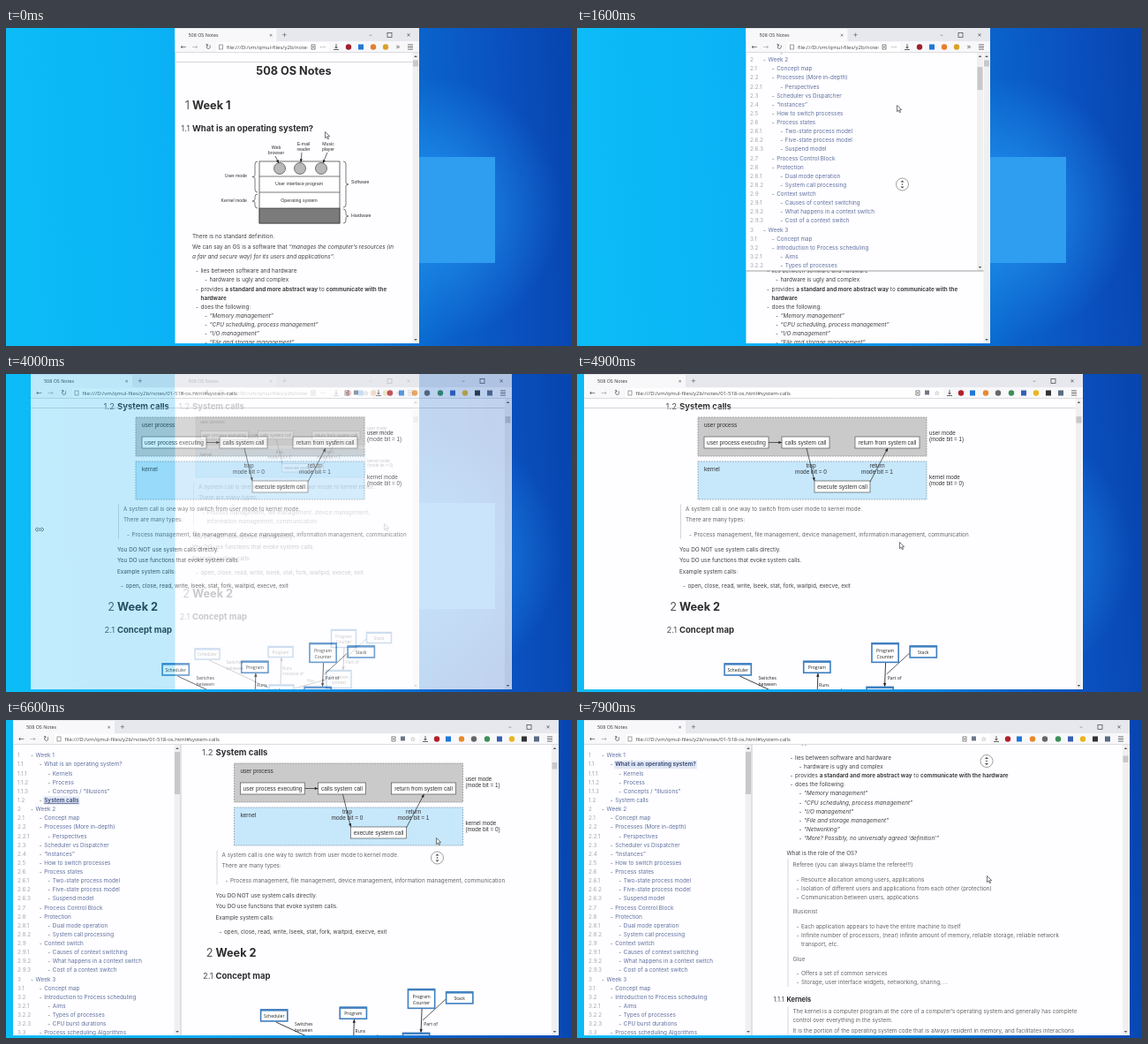
Recreate the animation shown at these times as an HTML page with a canvas. Size 640 px wide and 360 px high, loop 8000 ms.

```html
<!DOCTYPE html>
<html lang="en">
<head>
<meta charset="utf-8">
<title>OS Notes</title>
<style>
html, body { margin: 0; width: 100%; height: 100%; overflow: hidden; background: #0a78da; }
canvas { display: block; }
</style>
</head>
<body>
<canvas width="640" height="360"></canvas>
<script>
const screen2d = document.querySelector('canvas').getContext('2d');
const overlay = Object.assign(document.createElement('canvas'), { width: 640, height: 360 });
const overlay2d = overlay.getContext('2d');
let g = screen2d;

const INTER = 'Inter, sans-serif', ARIAL = '"Liberation Sans", Arial, sans-serif';
const UI = '"Open Sans", sans-serif', SYMBOL = '"DejaVu Sans", sans-serif';
const INK = '#404040', QUOTE = '#666', LINK = '#5f719f', ROW = 10.13, TOP = 28, BOTTOM = 357;

// Eased value of a list of [time, ...values] at time t
function at(keys, t) {
  const i = keys.findIndex(k => k[0] > t);
  if (i < 1) return (i ? keys[keys.length - 1] : keys[0]).slice(1);
  const a = keys[i - 1], b = keys[i], u = (t - a[0]) / (b[0] - a[0]), e = u * u * (3 - 2 * u);
  return a.slice(1).map((v, j) => v + (b[j + 1] - v) * e);
}

function text(s, x, y, size = 6.35, color = INK, style = '', align = 'left', font = INTER) {
  g.font = `${style} ${size}px ${font}`;
  g.fillStyle = color;
  g.textAlign = align;
  g.fillText(s, x, y + size * .34);
  return g.measureText(s).width;
}
const label = (s, x, y, size, align = 'center') => text(s, x, y, size, '#333', '', align, ARIAL);

// *bold* and _italic_ runs
function rich(s, x, y, color = INK) {
  let style = '';
  for (const part of s.split(/([*_])/)) {
    if (part === '*') style = style ? '' : '700';
    else if (part === '_') style = style ? '' : 'italic';
    else if (part) x += text(part, x, y, 6.35, color, style);
  }
}

function rect(x, y, w, h, fill, stroke) {
  if (fill) { g.fillStyle = fill; g.fillRect(x, y, w, h); }
  if (stroke) { g.strokeStyle = stroke; g.strokeRect(x, y, w, h); }
}
function disc(x, y, r, fill, stroke) {
  g.beginPath();
  g.arc(x, y, r, 0, 7);
  if (fill) { g.fillStyle = fill; g.fill(); }
  if (stroke) { g.strokeStyle = stroke; g.stroke(); }
}
function poly(points, fill) {
  g.beginPath();
  points.forEach(p => g.lineTo(...p));
  g.closePath();
  g.fillStyle = fill;
  g.fill();
}
function line(x1, y1, x2, y2, color = '#444') {
  g.strokeStyle = color;
  g.beginPath();
  g.moveTo(x1, y1);
  g.lineTo(x2, y2);
  g.stroke();
}
function arrow(x1, y1, x2, y2) {
  line(x1, y1, x2, y2, '#222');
  const a = Math.atan2(y2 - y1, x2 - x1), p = d => [x2 - 4 * Math.cos(a + d), y2 - 4 * Math.sin(a + d)];
  poly([[x2, y2], p(.4), p(-.4)], '#222');
}
const triangle = (x, y, d, s = 1.8, color = '#555') =>
  poly([[x - s, y - d * s / 2], [x + s, y - d * s / 2], [x, y + d * s / 2]], color);

function clipped(x, y, w, h, draw) {
  g.save();
  g.beginPath();
  g.rect(x, y, w, h);
  g.clip();
  draw();
  g.restore();
}
function placed(x, y, scale, draw) {
  g.save();
  g.translate(x, y);
  g.scale(scale, scale);
  draw();
  g.restore();
}

function wallpaper() {
  const base = g.createLinearGradient(0, 40, 640, 0);
  [[0, '#0cbcf7'], [.28, '#0ab2f5'], [.6, '#0a86e2'], [.74, '#0a62ca'], [.88, '#0a50be'], [1, '#0744ae']]
    .forEach(s => base.addColorStop(...s));
  rect(0, 0, 640, 360, base);
  const glow = g.createRadialGradient(480, 205, 10, 480, 205, 150);
  glow.addColorStop(0, 'rgba(40,160,250,.75)');
  glow.addColorStop(1, 'rgba(40,160,250,0)');
  rect(0, 0, 640, 360, glow);
  rect(434, 146, 120, 120, '#2f9df0');
}

function scrollbar(x, top, bottom, y, h) {
  rect(x, top, 7, bottom - top, '#f0f0f1');
  rect(x + .5, y, 6, h, '#c8c8ca');
  triangle(x + 3.5, top + 4, -1);
  triangle(x + 3.5, bottom - 4, 1);
}

function chrome(l, r, wide) {
  const w = r - l, sym = (s, x, y, size, color = '#555') => text(s, x, y, size, color, '', 'center', SYMBOL);
  rect(l, 0, w, BOTTOM, '#fefdff');
  rect(l, 0, w, 15, '#e7e8ee');
  rect(l, 1, 115, 14, '#f8f8fb');
  rect(l, 15, w, 13, '#f8f8fb');
  text('508 OS Notes', l + 15, 8, 5.4, '#333', '', 'left', UI);
  sym('✕', l + 108.5, 8, 5);
  sym('+', l + 124, 8, 7);
  sym('–', r - 55, 8, 7);
  rect(r - 36, 5.5, 5, 5, null, '#555');
  sym('✕', r - 12, 8, 6);
  sym('←', l + 9.5, 21.5, 8);
  sym('→', l + 22.5, 21.5, 8, '#aaa');
  sym('↻', l + 37.5, 21.5, 8);
  rect(l + 47, 16, (wide ? r - 158 : r - 102) - l - 47, 11, '#fff');
  rect(l + 50, 19, 4, 5, null, '#888');
  clipped(l + 58, 15, wide ? 250 : 92, 13, () =>
    text('file:///D:/vm/qmul-files/y2b/notes/01-518-os.html#system-calls', l + 58.5, 21.5, 6, '#444', '', 'left', UI));

  const page = x => { rect(x - 2, 19, 4, 5, null, '#666'); line(x - 1, 21.5, x + 1, 21.5); };
  const download = x => { line(x, 18, x, 22); triangle(x, 22.5, 1, 2); line(x - 3, 24.5, x + 3, 24.5); };
  const dots = list => list.forEach(([x, color, square]) =>
    square ? rect(r + x - 3, 18.5, 6, 6, color) : disc(r + x, 21.5, 3.2, color));
  if (wide) {
    page(r - 187);
    rect(r - 179, 18.5, 5, 5, '#6d7688');
    sym('☆', r - 165, 21.5, 7);
    download(r - 151);
    dots([[-138, '#b0202c'], [-125, '#1f78d6', 1], [-110, '#e8892a'], [-96, '#666'], [-81, '#3c8f58'],
      [-67, '#365fb5', 1], [-53, '#e9b51f'], [-39, '#333', 1], [-25, '#5b6b82', 1]]);
  } else {
    page(r - 120);
    sym('···', r - 109, 21.5, 7);
    download(r - 94);
    dots([[-80, '#a01f2b'], [-66, '#1f78d6', 1], [-52, '#e47f2c'], [-38, '#d8a326']]);
    sym('»', r - 24, 21.5, 8);
  }
  [19, 21.5, 24].forEach(y => line(r - 13, y, r - 7, y));
  line(l, 27.5, r, 27.5, '#d5d5da');
}

const TOC = `1Week 1;2What is an operating system?;3Kernels;3Process;3Concepts / “Illusions”;2System calls;1Week 2;2Concept map;2Processes (More in-depth);3Perspectives;2Scheduler vs Dispatcher;2“Instances”;2How to switch processes;2Process states;3Two-state process model;3Five-state process model;3Suspend model;2Process Control Block;2Protection;3Dual mode operation;3System call processing;2Context switch;3Causes of context switching;3What happens in a context switch;3Cost of a context switch;1Week 3;2Concept map;2Introduction to Process scheduling;3Aims;3Types of processes;3CPU burst durations;2Process scheduling Algorithms`.split(';');

function contents(x, y, active) {
  const n = [0, 0, 0];
  TOC.forEach((item, i) => {
    const level = +item[0], name = item.slice(1), tx = x + 11 + level * 9.6, ty = y + i * ROW;
    n[level - 1]++;
    n.fill(0, level);
    text(n.slice(0, level).join('.'), x, ty, 6.35, '#a6a6b2');
    text('-', tx - 5.5, ty, 6.35, '#666');
    if (i !== active) return text(name, tx, ty, 6.35, LINK);
    g.font = `700 6.35px ${INTER}`;
    const w = g.measureText(name).width;
    rect(tx - 1, ty - 4.5, w + 2, 9.5, '#e2e8f5');
    text(name, tx, ty, 6.35, '#41527f', '700');
    if (i === 5) line(tx, ty + 3.5, tx + w, ty + 3.5, '#41527f');
  });
}

function heading(number, s, x, y, size) {
  text(number, x - 3, y, size, '#555', '', 'right');
  text(s, x, y, size, '#2c2c2c', '700');
}
function item(x, y, level, s, color) {
  text('-', x + 4 + level * 10, y, 6.35, color);
  rich(s, x + 9.5 + level * 10, y, color);
}

function brace(x, y1, y2, d) {
  const m = (y1 + y2) / 2, a = x + 3 * d;
  g.strokeStyle = '#444';
  g.beginPath();
  g.moveTo(x, y1);
  g.quadraticCurveTo(a, y1, a, y1 + 3);
  g.lineTo(a, m - 2);
  g.quadraticCurveTo(a, m, x + 6 * d, m);
  g.quadraticCurveTo(a, m, a, m + 2);
  g.lineTo(a, y2 - 3);
  g.quadraticCurveTo(a, y2, x, y2);
  g.stroke();
}

// Layers of a computer, around its top centre
function layers() {
  g.lineWidth = .7;
  rect(-39, 23, 91, 70, '#fff', '#333');
  rect(-39, 76, 91, 17, '#7b7b7b', '#333');
  line(-39, 40, 52, 40);
  line(-39, 58, 52, 58);
  [-16, 7, 31].forEach(x => disc(x, 31, 6.5, '#b8b8b8', '#444'));
  [['Web', 'browser', -20, 7], ['E-mail', 'reader', 11, 3], ['Music', 'player', 39, 3]].forEach(([a, b, x, y]) => {
    label(a, x, y, 5.2);
    label(b, x, y + 6.5, 5.2);
  });
  arrow(-21, 17, -17, 25);
  arrow(9, 13, 8, 24);
  arrow(38, 13, 33, 25);
  label('User interface program', 6, 48.5, 5.3);
  label('Operating system', 6, 67.5, 5.3);
  label('User mode', -53, 39.5, 5.2, 'right');
  label('Kernel mode', -53, 67.5, 5.2, 'right');
  label('Software', 65, 46.5, 5.2, 'left');
  label('Hardware', 65, 84.5, 5.2, 'left');
  brace(-41, 23, 58, -1);
  brace(-41, 60, 76, -1);
  brace(56, 23, 75, 1);
  brace(56, 77, 93, 1);
}

// User and kernel mode boxes
function modes() {
  g.lineWidth = .7;
  g.setLineDash([2, 1]);
  rect(0, 0, 259, 44, '#cacaca', '#888');
  rect(0, 50, 259, 43, '#c7e7fb', '#7d99aa');
  g.setLineDash([]);
  [['user process executing', 7, 22, 73], ['calls system call', 95, 22, 54], ['return from system call', 178, 22, 73],
    ['execute system call', 132, 72, 63]].forEach(([s, x, y, w]) => {
    rect(x, y, w, 13, '#fff', '#555');
    label(s, x + w / 2, y + 6.5, 6.5);
  });
  arrow(80, 28.5, 95, 28.5);
  arrow(123, 35, 132, 72);
  arrow(195, 73, 215, 35);
  label('user process', 7, 9, 6.5, 'left');
  label('kernel', 7, 58.5, 6.5, 'left');
  [[128, 'trap', 0], [203, 'return', 1]].forEach(([x, s, bit]) => {
    label(s, x, 54.5, 6.5);
    label('mode bit = ' + bit, x, 62, 6.5);
  });
  [['user', 18, 1], ['kernel', 68, 0]].forEach(([s, y, bit]) => {
    label(s + ' mode', 262, y, 6.3, 'left');
    label(`(mode bit = ${bit})`, 262, y + 7.3, 6.3, 'left');
  });
}

function conceptMap() {
  const note = (s, x, y, align = 'center') => text(s, x, y, 4.7, '#222', '', align, UI);
  g.lineWidth = .8;
  arrow(17, 35, 84, 66);
  arrow(98, 62, 99, 32);
  arrow(114, 67, 149, 57);
  arrow(170, 21, 169, 46);
  line(195, 11, 171, 33);
  [['Scheduler', 15, 28], ['Program', 98, 25.5], ['Program Counter', 169.5, 10.5], ['Stack', 209.5, 9.5],
    ['Execution context', 164, 56.5], ['Process', 99, 69]].forEach(([s, x, y]) => {
    const words = s.split(' '), h = words.length > 1 ? 20 : 12;
    g.lineWidth = 1.5;
    rect(x - 14, y - h / 2, 28, h, '#fff', '#3f7fc0');
    rect(x - 14, y - h / 2 - .5, 28, 2, '#3f7fc0');
    words.forEach((word, i) => note(word, x, y + .8 + (i - (words.length - 1) / 2) * 6.5));
  });
  note('Switches', 46, 37.5);
  note('between', 46, 44);
  note('Runs', 100, 44.5, 'left');
  note('instance of', 100, 50.5, 'left');
  note('Has', 132, 58);
  note('Part of', 172, 37, 'left');
}

function intro(x, wide) {
  const centre = x + (wide ? 174.5 : 115);
  text('508 OS Notes', centre, 48.5, 12.7, '#2c2c2c', '700', 'center');
  heading('1', 'Week 1', x, 88, 12.7);
  heading('1.1', 'What is an operating system?', x, 114, 9.5);
  placed(centre, 128, wide ? 1.35 : 1, layers);
  let y = wide ? 269 : 236;
  rich('There is no standard definition.', x, y);
  const say = 'We can say an OS is a software that _“manages the computer’s resources (in';
  rich(wide ? say + ' a fair and secure way) for its users_' : say + '_', x, y + 12.3);
  rich(wide ? '_and applications”_:' : '_a fair and secure way) for its users and applications”_:', x, y + 22.5);
  y += 39.2;
  const next = (level, s) => { item(x, y, level, s); y += ROW; };
  next(0, 'lies between software and hardware');
  next(1, 'hardware is ugly and complex');
  next(0, 'provides *a standard and more abstract way* to *communicate with the' + (wide ? ' hardware*' : '*'));
  if (!wide) { rich('*hardware*', x + 9.5, y); y += ROW; }
  next(0, 'does the following:');
  ['Memory management', 'CPU scheduling, process management', 'I/O management', 'File and storage management', 'Networking',
    'More? Possibly, no universally agreed ‘definition’'].forEach(s => next(1, `_“${s}”_`));
}

function bar(x, y1, y2) { g.lineWidth = .8; line(x + 1.5, y1, x + 1.5, y2, '#ccc'); }

// Remainder of the first section; y is measured from the view it opens in
function roles(x) {
  const p = (s, y) => rich(s, x + 7, y, QUOTE), li = (s, y) => item(x + 7, y, 0, s, QUOTE);
  rich('What is the role of the OS?', x, 150.5);
  bar(x, 157, 302);
  p('Referee (you can always blame the referee!!!)', 163.5);
  li('Resource allocation among users, applications', 180.5);
  li('Isolation of different users and applications from each other (protection)', 190.5);
  li('Communication between users, applications', 200.5);
  p('Illusionist', 217);
  li('Each application appears to have the entire machine to itself', 233.5);
  li('Infinite number of processors, (near) infinite amount of memory, reliable storage, reliable network', 243.5);
  rich('transport, etc.', x + 16.5, 254, QUOTE);
  p('Glue', 270.5);
  li('Offers a set of common services', 286.5);
  li('Storage, user interface widgets, networking, sharing, …', 297);
  heading('1.1.1', 'Kernels', x, 316, 7.4);
  bar(x, 324, 367);
  p('The kernel is a computer program at the core of a computer’s operating system and generally has complete', 329.5);
  p('control over everything in the system.', 339.5);
  p('It is the portion of the operating system code that is always resident in memory, and facilitates interactions', 352);
  p('between hardware and software components.', 362);
  heading('1.1.2', 'Process', x, 385, 7.4);
  rich('A process is a program in execution.', x, 399);
  heading('1.1.3', 'Concepts / “Illusions”', x, 422, 7.4);
  item(x, 436, 0, 'Each process appears to have the machine to itself');
}

function systemCalls(x, wide) {
  heading('1.2', 'System calls', x, 36.8, 9.5);
  placed(x + (wide ? 21 : 4), wide ? 49 : 48, wide ? 1 : .741, modes);
  let y = wide ? 152.5 : 127.5;
  bar(x, y - 5, y + (wide ? 34 : 44));
  rich('A system call is one way to switch from user mode to kernel mode.', x + 7, y, QUOTE);
  rich('There are many types:', x + 7, y + 12.6, QUOTE);
  const types = 'Process management, file management, device management,', rest = 'information management, communication';
  item(x + 7, y + 29.3, 0, wide ? types + ' ' + rest : types, QUOTE);
  if (!wide) rich(rest, x + 16.5, y + 39.2, QUOTE);
  y = wide ? 198.7 : 183.5;
  rich('You DO NOT use system calls directly.', x, y);
  rich('You DO use functions that evoke system calls.', x, y + 12.6);
  rich('Example system calls:', x, y + 25.2);
  item(x, y + 41.6, 0, 'open, close, read, write, lseek, stat, fork, waitpid, execve, exit');
  heading('2', 'Week 2', x, y + 65.3, 12.7);
  heading('2.1', 'Concept map', x, y + 91, 9.5);
  placed(x + (wide ? 50 : 2), y + 105.5, wide ? 1.08 : 1, conceptMap);
}

function pointer(x, y) {
  placed(x - .5, y - .5, .72, () => {
    g.beginPath();
    [[0, 0], [0, 10], [2.4, 7.8], [4, 11.5], [5.6, 10.8], [4, 7.2], [7.2, 7]].forEach(p => g.lineTo(...p));
    g.closePath();
    g.fillStyle = '#fff';
    g.fill();
    g.lineWidth = 1;
    g.strokeStyle = '#444';
    g.stroke();
  });
}
function resizer(x, y) {
  g.lineWidth = .7;
  line(x - 3, y - 1, x + 3, y - 1);
  line(x - 3, y + 1, x + 3, y + 1);
  [-1, 1].forEach(d => {
    line(x + 5 * d, y, x + 2.5 * d, y - 2.5);
    line(x + 5 * d, y, x + 2.5 * d, y + 2.5);
  });
}
function panner(x, y) {
  g.lineWidth = .8;
  disc(x, y, 7, '#fff', '#888');
  triangle(x, y - 3.5, -1, 2, '#444');
  triangle(x, y + 3.5, 1, 2, '#444');
  disc(x, y, .8, '#444');
}

// Lower edge of the contents panel
function panelEdge(l, r, height) {
  g.lineWidth = .8;
  line(l, TOP + height, r, TOP + height, height > 11 ? '#888' : '#ccc');
}

const narrowCursor = [[0, 362, 118], [600, 366, 36], [1000, 368, 176], [1250, 368, 235], [1600, 363, 88], [2000, 360, 96],
  [2400, 252, 91], [2500, 252, 91], [2900, 406, 304], [3700, 429, 170]];
const wideCursor = [[3700, 46, 176], [4000, 38, 176], [4300, 12, 176], [4900, 366, 191], [5400, 573, 186], [5500, 573, 186],
  [6000, 626, 186], [6400, 488, 156], [6600, 488, 134], [7100, 486, 96], [7500, 464, 46], [7900, 465, 177]];

function narrowScene(t) {
  const l = 191.5, r = 468, jumped = t >= 2500;
  wallpaper();
  g.lineWidth = .8;
  chrome(l, r, false);
  clipped(l, TOP, r - l, BOTTOM - TOP, () => jumped ? systemCalls(211, false) : intro(211, false));
  scrollbar(r - 7.5, TOP, BOTTOM, jumped ? 48 : 36.5, 7);
  const [height] = jumped ? [10.5] : at([[600, 10.5], [800, 247]], t);
  if (height > 11) {
    const [scroll] = at([[1000, 0], [1400, 80], [1600, 65], [1900, 0]], t);
    clipped(l, TOP, r - 7.5 - l, height, () => {
      rect(l, TOP, r - l, height, '#fefdff');
      contents(196, 40.2 - scroll);
      scrollbar(r - 15, TOP, 275, 36 + scroll * .125, 26);
    });
  }
  panelEdge(l, r - 7.5, height);
  if (t >= 1000 && t < 2000) panner(368.5, 177);
  pointer(...at(narrowCursor, t));
}

function wideScene(t) {
  const [l] = at([[3700, 40], [4000, 28], [4300, 8]], t);
  const [r] = at([[5500, 573], [6000, 626]], t);
  const [scroll] = at([[6600, 710], [7200, 190], [7500, 190], [7900, 265.5]], t);
  const side = r > 590, left = side ? 198 : l, x = (left + r) / 2 - 174.5;
  wallpaper();
  g.lineWidth = .8;
  chrome(l, r, true);
  clipped(left, TOP, r - left, BOTTOM - TOP, () => {
    placed(0, -scroll, 1, () => intro(x, true));
    placed(0, 265.5 - scroll, 1, () => roles(x));
    placed(0, 710 - scroll, 1, () => systemCalls(x, true));
  });
  g.lineWidth = .8;
  scrollbar(r - 8, TOP, BOTTOM, 36 + scroll / 59, 7.5);
  if (side) {
    const active = [565, 600, 650, 690].reduce((n, s) => n + (scroll > s), 1);
    clipped(l, TOP, 191, BOTTOM - TOP, () => contents(13, 40.2, active));
    scrollbar(190.5, TOP, BOTTOM, 36, 48);
    line(198, TOP, 198, BOTTOM, '#bbb');
  } else panelEdge(l, r - 8, 10.5);
  if (t >= 6400 && t < 7200) panner(488.5, 156);
  if (t >= 7500) panner(464, 46.5);
  const dragging = t < 4400 || (t >= 5400 && t <= 6000);
  (dragging ? resizer : pointer)(...at(wideCursor, t));
}

function frame(now) {
  const t = Math.floor(now % 8000 / 100) * 100, fade = Math.min(1, Math.max(0, (t - 3700) / 400));
  g = screen2d;
  if (fade < 1) narrowScene(t);
  if (fade > 0) {
    g = overlay2d;
    wideScene(t);
    screen2d.globalAlpha = fade;
    screen2d.drawImage(overlay, 0, 0);
    screen2d.globalAlpha = 1;
  }
  requestAnimationFrame(frame);
}
requestAnimationFrame(frame);
</script>
</body>
</html>
```
